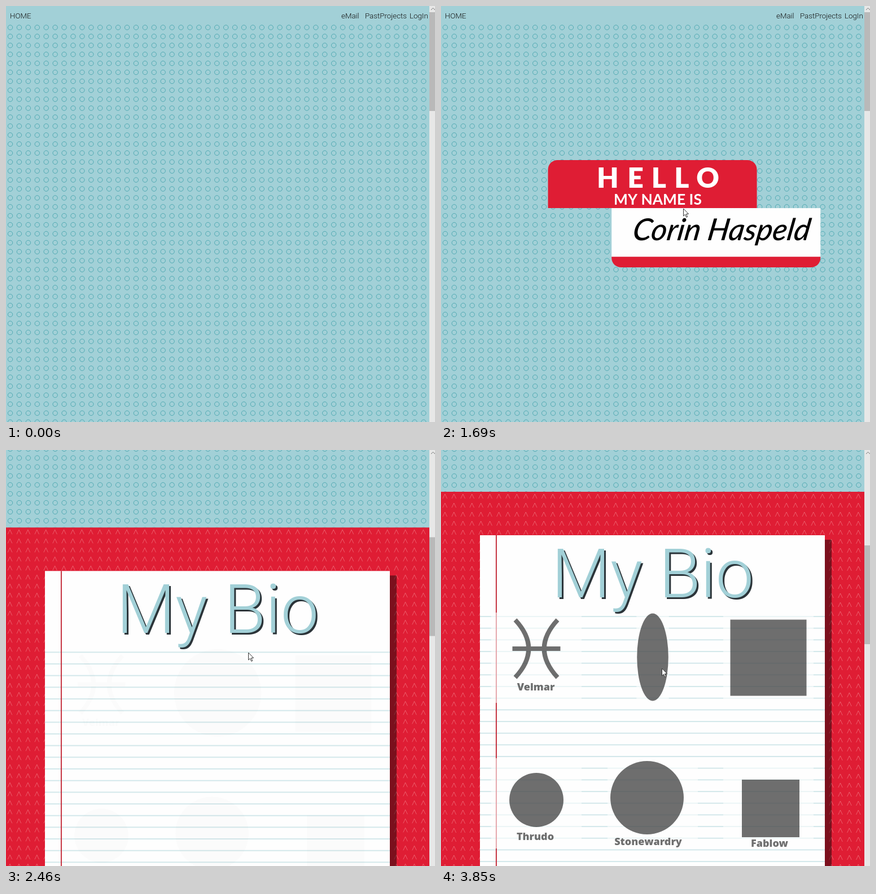
Recreate the animation shown at these times as an HTML page with a canvas. Size 760 px wide and 737 px high, loop 3.95 s.

```html
<!DOCTYPE html>
<html lang="en">
<head>
<meta charset="utf-8">
<title>Portfolio page</title>
<style>
  html, body { margin: 0; width: 100%; height: 100%; overflow: hidden; }
  canvas { display: block; }
</style>
</head>
<body>
<canvas id="stage" width="760" height="737"></canvas>
<script>
const ctx = document.getElementById('stage').getContext('2d');
const LOOP = 3950, PAGE_W = 750, STAGE_H = 737, HERO_H = 765, MID = 375;
const TEAL = '#a2d0d7', RED = '#df1d34';
const PAPER = { x: 69, y: 842, w: 611 };

const clamp01 = v => Math.max(0, Math.min(1, v));
const smooth = u => u * u * (3 - 2 * u);
const progress = (t, from, to) => clamp01((t - from) / (to - from));

function rect(x, y, w, h, color) {
  ctx.fillStyle = color;
  ctx.fillRect(x, y, w, h);
}

function text(str, x, y, font, color, align = 'center') {
  ctx.font = font;
  ctx.fillStyle = color;
  ctx.textAlign = align;
  ctx.fillText(str, x, y);
}

function roundedFill(x, y, w, h, radii, color) {
  ctx.beginPath();
  ctx.roundRect(x, y, w, h, radii);
  ctx.fillStyle = color;
  ctx.fill();
}

// Linear path through [time, x, y] points.
function follow(points, t) {
  let i = 1;
  while (i < points.length - 1 && t > points[i][0]) i++;
  const [a, b] = [points[i - 1], points[i]];
  const u = progress(t, a[0], b[0]);
  return [a[1] + (b[1] - a[1]) * u, a[2] + (b[2] - a[2]) * u];
}

const cursorPath = [
  [250, 690, 775], [330, 672, 735], [530, 566, 515], [770, 540, 463],
  [1070, 508, 434], [1500, 429, 359], [2780, 429, 359], [2920, 504, 365],
  [3070, 555, 372], [3240, 512, 374], [3600, 458, 381], [3850, 391, 387]
];

const scrollAt = t => 691 * smooth(progress(t, 1834, 2605));

function tagScale(t) {
  const d = Math.max(0, Math.min(1600, t - 1080));
  return (318 + 0.1053 * d - 3.29e-5 * d * d) / 393;
}

function drawHero() {
  rect(0, 0, PAGE_W, HERO_H, TEAL);
  ctx.save();
  ctx.beginPath();
  ctx.rect(0, 0, PAGE_W, HERO_H);
  ctx.clip();
  ctx.beginPath();
  for (let y = 38; y < HERO_H + 5; y += 15.89) {
    for (let x = 7.5; x < PAGE_W; x += 15.92) {
      ctx.moveTo(x + 4.2, y);
      ctx.arc(x, y, 4.2, 0, Math.PI * 2);
    }
  }
  ctx.strokeStyle = '#48a5ae';
  ctx.lineWidth = 0.9;
  ctx.stroke();
  ctx.restore();

  const nav = '300 13.3px Roboto, sans-serif';
  text('HOME', 7, 22, nav, '#111', 'left');
  text('eMail', 594, 22, nav, '#111', 'left');
  text('PastProjects', 636, 22, nav, '#111', 'left');
  text('LogIn', 715, 22, nav, '#111', 'left');
}

function inTag(x, scale, draw) {
  ctx.save();
  ctx.translate(x, 368);
  ctx.scale(scale, scale);
  draw();
  ctx.restore();
}

function drawTag(t) {
  const scale = tagScale(t);
  const topX = t < 70 ? -400 : MID - (0.004317 * Math.max(0, 1866 - t)) ** 3;
  const bottomX = MID + (0.00705 * Math.max(0, 2705 - t)) ** 2.4;

  inTag(topX, scale, () => {
    roundedFill(-196.5, -101, 393, 90.5, [18, 18, 0, 0], RED);
    const offsets = [-84, -32, 12, 55, 104];
    [...'HELLO'].forEach((c, i) =>
      text(c, offsets[i], -49, '900 53px Lato, sans-serif', '#fff'));
    text('MY NAME IS', 10, -17, 'bold 28px Lato, sans-serif', '#fff');
  });

  inTag(bottomX, scale, () => {
    rect(-196.5, -10.5, 393, 92, '#fefefe');
    roundedFill(-196.5, 81, 393, 20, [0, 0, 18, 18], RED);
    ctx.translate(8, 50);
    ctx.transform(1, 0, -0.16, 1, 0, 0);
    text('Corin Haspeld', 0, 0, 'italic 500 57px Lato, sans-serif', '#000');
  });
}

function drawBioBackground(bottom) {
  rect(0, HERO_H, PAGE_W, bottom - HERO_H, RED);
  ctx.beginPath();
  for (let y = 773; y < bottom + 8; y += 16) {
    for (let x = 7; x < PAGE_W; x += 15.92) {
      ctx.moveTo(x - 3.8, y + 4);
      ctx.lineTo(x, y - 4);
      ctx.lineTo(x + 3.8, y + 4);
    }
  }
  ctx.strokeStyle = 'rgba(255,190,190,0.5)';
  ctx.lineWidth = 0.8;
  ctx.stroke();
}

function drawPaper(bottom) {
  const { x, y, w } = PAPER;
  rect(x + 12, y + 8, w, bottom - y, 'rgba(0,0,0,0.45)');
  rect(x, y, w, bottom - y, '#fefefe');
  for (let line = 986; line < bottom; line += 20.67) {
    rect(x, line - 1, w, 2, '#d3e8eb');
  }
  rect(97, y, 1.8, bottom - y, '#c0202f');

  const title = '300 120px Roboto, sans-serif';
  text('My Bio', MID + 3, 955, title, '#2b3439');
  text('My Bio', MID, 952, title, TEAL);
}

function disc(x, y, r) {
  ctx.beginPath();
  ctx.arc(x, y, r, 0, Math.PI * 2);
  ctx.fill();
}

function square(x, y, side) {
  ctx.fillRect(x - side / 2, y - side / 2, side, side);
}

function fishGlyph() {
  ctx.lineWidth = 8;
  ctx.beginPath();
  for (const side of [-1, 1]) {
    ctx.moveTo(side * 37.5, -67);
    ctx.quadraticCurveTo(side * -10, -16, side * 37.5, 35);
  }
  ctx.moveTo(-42.5, -16);
  ctx.lineTo(42.5, -16);
  ctx.stroke();
}

// Icons are drawn around the centre of their 160px tile.
const tiles = [
  { x: 169, y: 1059, icon: fishGlyph, label: 'Velmar', labelX: -1, labelY: 58 },
  { x: 375, y: 1059, icon: () => disc(0, -1, 77.5), spin: t => 69 * progress(t, 3600, 3850) ** 1.5 },
  { x: 580, y: 1059, icon: () => square(0, 0, 135),
    spin: t => t < 3240 ? 145 * progress(t, 2900, 3240) : 145 * (1 - smooth(progress(t, 3240, 3620))) },
  { x: 169, y: 1317, icon: () => disc(0, -6, 48), label: 'Thrudo', labelX: -2, labelY: 65 },
  { x: 375, y: 1317, icon: () => disc(-10, -10, 65), label: 'Stonewardry', labelX: -8, labelY: 74 },
  { x: 580, y: 1317, icon: () => square(4, 9, 102), label: 'Fablow', labelX: 2, labelY: 77 }
];

function drawTiles(t) {
  const alpha = 0.565 * (Math.max(0, t - 2400) / 1450) ** 1.22;
  if (!alpha) return;
  for (const tile of tiles) {
    ctx.save();
    ctx.globalAlpha = alpha;
    ctx.translate(tile.x, tile.y);
    if (tile.spin) ctx.scale(Math.cos(tile.spin(t) * Math.PI / 180), 1);
    rect(-80, -80, 160, 160, '#fff');
    ctx.fillStyle = ctx.strokeStyle = '#000';
    tile.icon();
    if (tile.label) {
      text(tile.label, tile.labelX, tile.labelY, '800 18px "Open Sans", sans-serif', '#000');
    }
    ctx.restore();
  }
}

function drawScrollbar(scroll) {
  rect(PAGE_W, 0, 10, STAGE_H, '#e7e7e7');
  rect(PAGE_W, 11 + scroll * 158 / 691, 10, 175, '#b9b9b9');
  ctx.beginPath();
  ctx.moveTo(753, 7);
  ctx.lineTo(756.5, 3.5);
  ctx.lineTo(760, 7);
  ctx.strokeStyle = '#777';
  ctx.lineWidth = 1;
  ctx.stroke();
}

function drawCursor(t) {
  const [x, y] = follow(cursorPath, t);
  ctx.save();
  ctx.translate(x + 0.5, y);
  ctx.beginPath();
  ctx.moveTo(0, 0);
  [[0, 13], [3, 10.3], [5.2, 15.3], [7.2, 14.4], [5, 9.6], [9, 9.3]]
    .forEach(p => ctx.lineTo(...p));
  ctx.closePath();
  ctx.fillStyle = '#fff';
  ctx.fill();
  ctx.strokeStyle = '#333';
  ctx.lineWidth = 1;
  ctx.stroke();
  ctx.restore();
}

function render() {
  const t = performance.now() % LOOP;
  const scroll = scrollAt(t);
  const bottom = scroll + STAGE_H;

  ctx.save();
  ctx.translate(0, -scroll);
  drawHero();
  drawTag(t);
  if (bottom > HERO_H) {
    drawBioBackground(bottom);
    drawPaper(bottom);
    drawTiles(t);
  }
  ctx.restore();

  drawScrollbar(scroll);
  drawCursor(t);
  requestAnimationFrame(render);
}
requestAnimationFrame(render);
</script>
</body>
</html>
```
